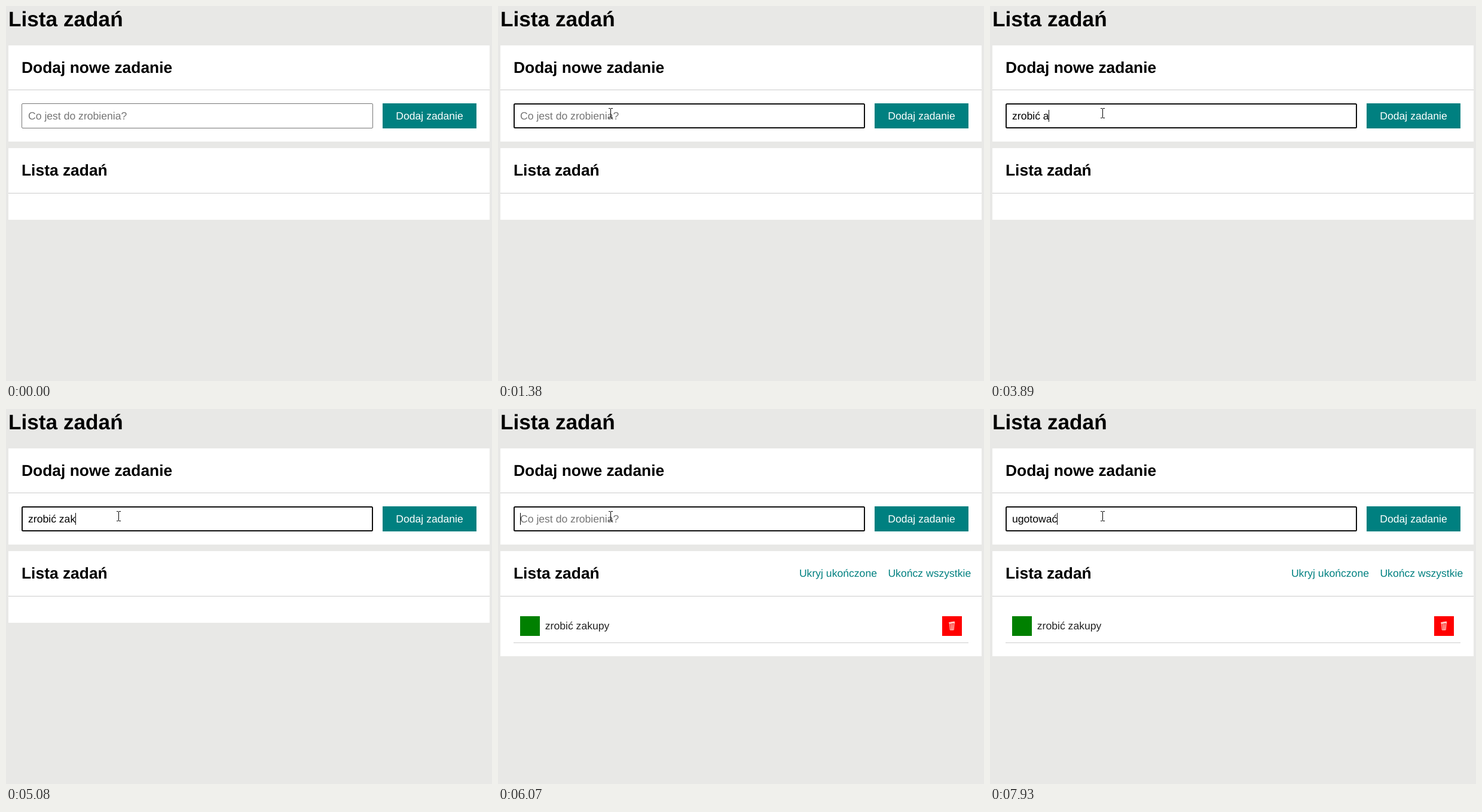
These frames come from a looping animation (813x628 px, 8 s). An HTML page:

```html
<!DOCTYPE html>
<html lang="pl">
<head>
<meta charset="utf-8">
<title>Lista zadań</title>
<style>
  html, body { margin: 0; width: 100%; height: 100%; overflow: hidden; background: #e8e8e6; }
  svg { display: block; font: 17.6px "Liberation Sans", Arial, sans-serif; text-rendering: geometricPrecision; }
  text { white-space: pre; }
  rect, .crisp { shape-rendering: crispEdges; }
  .h1 { font-size: 35.2px; font-weight: bold; }
  .h2 { font-size: 26.4px; font-weight: bold; }
  .card { fill: #fff; }
  .rule { fill: #ccc; }
  .link { fill: teal; }
  #box { fill: #fff; shape-rendering: auto; }
  #hint { fill: #757575; }
</style>
</head>
<body>
<svg width="813" height="628" viewBox="0 0 813 628">
  <text class="h1" x="4" y="34">Lista zadań</text>

  <rect class="card" x="4" y="66" width="805" height="161"/>
  <text class="h2" x="26" y="112">Dodaj nowe zadanie</text>
  <rect class="rule" x="4" y="140" width="805" height="1"/>
  <rect id="box"/>
  <text id="hint" x="37" y="190">Co jest do zrobienia?</text>
  <text id="typed" x="37" y="190"></text>
  <rect id="caret" y="174" width="1" height="20"/>
  <rect x="630" y="163" width="157" height="42" fill="teal"/>
  <text x="652.3" y="190" fill="#fff">Dodaj zadanie</text>

  <rect id="list" class="card" x="4" y="238" width="805" height="120"/>
  <text class="h2" x="26" y="284">Lista zadań</text>
  <rect class="rule" x="4" y="313" width="805" height="1"/>

  <g id="task">
    <text class="link" x="503.9" y="281">Ukryj ukończone</text>
    <text class="link" x="652.4" y="281">Ukończ wszystkie</text>
    <rect x="37" y="347" width="33" height="33" fill="green"/>
    <text x="78.8" y="369" fill="#222">zrobić zakupy</text>
    <rect x="743" y="347" width="33" height="33" fill="red"/>
    <g fill="none" stroke="#ffd2c8">
      <path d="M754.5 357.5L763.5 356L764 358.5L755 359.5Z" fill="#ffd2c8" stroke-width=".8"/>
      <path d="M755.3 359.5L756.3 370H762.2L763.3 359M757.6 360L758 370M759.4 360V370M761.3 360L760.8 370"/>
    </g>
    <rect class="rule" x="26" y="391" width="761" height="1"/>
  </g>

  <circle id="click" cx="186" cy="178" r="12" fill="#ff0" fill-opacity=".47"/>
  <path id="arrow" d="M.5.5V16.5L4.2 13L6.7 18.7L9 17.7L6.6 12.1H11.6Z" fill="#fff" stroke="#000"/>
  <path id="beam" class="crisp" d="M185 171h3v1h-3zM189 171h3v1h-3zM188 172h1v15h-1zM185 187h3v1h-3zM189 187h3v1h-3z"/>
</svg>
<script>
const LOOP = 8000, HOVER = 720, FOCUS = 780, CLICK_END = 920, ADDED = 6070;

// [time, field text, caret shown]
const typing = [
  [0, '', 0], [FOCUS, '', 1], [1380, '', 0],
  [1710, 'z', 1], [1970, 'zr', 1], [2240, 'zro', 1], [2770, 'zro', 0],
  [2840, 'zrob', 1], [2960, 'zrobi', 1], [3290, 'zrobić', 1], [3430, 'zrobić ', 1],
  [3890, 'zrobić a', 1], [4220, 'zrobić ', 1], [4350, 'zrobić z', 1],
  [4550, 'zrobić za', 1], [5080, 'zrobić zak', 1], [5280, 'zrobić zaku', 1],
  [5470, 'zrobić zakup', 1], [5740, 'zrobić zakupy', 1],
  [ADDED, '', 1], [6270, '', 0],
  [6540, 'u', 1], [6870, 'ug', 1], [7000, 'ugo', 1], [7200, 'ugot', 1],
  [7330, 'ugoto', 1], [7400, 'ugotow', 1], [7530, 'ugotowa', 1], [7930, 'ugotować', 1]
];

// [time, x, y] of the arrow on its way to the field
const path = [
  [260, 753, 526], [330, 680, 420], [390, 560, 300],
  [460, 420, 210], [530, 310, 160], [590, 245, 149]
];

// Advance widths in em
const widths = { z: .5, r: .333, o: .556, b: .556, i: .222, 'ć': .5, ' ': .278, a: .556,
                 k: .5, u: .556, p: .556, y: .5, g: .556, t: .278, w: .722 };

const $ = id => document.getElementById(id);
const box = $('box'), hint = $('hint'), typed = $('typed'), caret = $('caret');
const list = $('list'), task = $('task'), click = $('click'), arrow = $('arrow'), beam = $('beam');

const stepAt = (steps, t) => steps.findLast(s => s[0] <= t);
const show = (el, on) => el.style.display = on ? '' : 'none';
const set = (el, attrs) => { for (const k in attrs) el.setAttribute(k, attrs[k]); };

function drawBox(line, color) {
  set(box, { x: 26 + line / 2, y: 163 + line / 2, width: 588 - line, height: 42 - line,
             rx: 1.5, stroke: color, 'stroke-width': line });
}

function render(t) {
  const [, text, caretOn] = stepAt(typing, t);
  typed.textContent = text;
  show(hint, !text);
  show(caret, caretOn);
  const end = [...text].reduce((x, c) => x + widths[c] * 17.6, 37);
  set(caret, { x: Math.floor(end) });

  if (t < FOCUS) drawBox(1, t < HOVER ? '#767676' : '#444');
  else drawBox(2, '#101010');

  const pos = t < HOVER && stepAt(path, t);
  show(arrow, pos);
  if (pos) set(arrow, { transform: `translate(${pos[1]} ${pos[2]})` });
  show(beam, t >= HOVER);
  show(click, t >= FOCUS && t < CLICK_END);

  show(task, t >= ADDED);
  set(list, { height: t < ADDED ? 120 : 176 });
}

const start = performance.now();
function tick() {
  render((performance.now() - start) % LOOP);
  requestAnimationFrame(tick);
}
tick();
</script>
</body>
</html>
```
